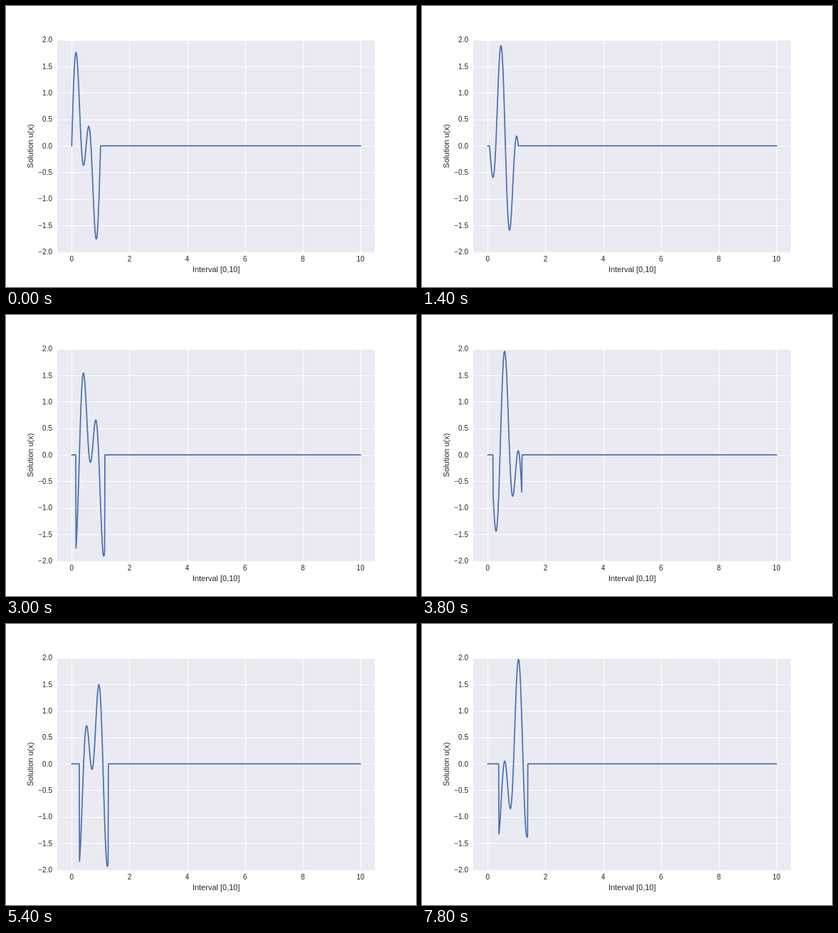
Write an HTML page with a canvas that moves like this. It is 576x396 px and loops after 8000 ms.

```html
<!DOCTYPE html>
<html lang="en">
<head>
<meta charset="utf-8">
<title>Dispersive wave</title>
<style>
  html, body { margin: 0; width: 100%; height: 100%; overflow: hidden; background: #fff; }
  canvas { display: block; }
</style>
</head>
<body>
<canvas id="plot" width="576" height="396"></canvas>
<script>
const ctx = document.getElementById("plot").getContext("2d");

const STEP_MS = 200, STEPS = 40;
const LAST = 1000;   // grid points 0..1000, spaced 0.01
const WIDTH = 100;   // width of the wave window in grid points
const box = { left: 72, right: 518, top: 48, bottom: 347 };
const TAU = 2 * Math.PI;

const px = x => 72 + 446.4 * (x + 0.5) / 11;
const py = u => 47.52 + 298.98 * (2 - u) / 4;

// Two modes, each travelling with its own phase speed 1 + m²
const mode = (m, x, t) => Math.sin(TAU * m * (x - (1 + m * m) * t));

function wave(i, n) {
  if (i < n || i >= n + WIDTH) return 0;
  return mode(1, i / 100, n / 100) + mode(2, i / 100, n / 100);
}

function text(str, x, y, size, align) {
  ctx.font = size + 'px "Liberation Sans", Arial, sans-serif';
  ctx.textAlign = align;
  ctx.fillText(str, x, y);
}

function drawAxes() {
  ctx.fillStyle = "#fff";
  ctx.fillRect(0, 0, 576, 396);
  ctx.fillStyle = "#eaeaf2";
  ctx.fillRect(box.left, box.top, box.right - box.left, box.bottom - box.top);

  ctx.fillStyle = "#fff";
  for (let x = 0; x <= 10; x += 2)
    ctx.fillRect(Math.round(px(x)), box.top, 1, box.bottom - box.top);
  for (let u = -2; u <= 2; u += 0.5)
    ctx.fillRect(box.left, Math.round(py(u)), box.right - box.left, 1);

  ctx.fillStyle = "#262626";
  for (let x = 0; x <= 10; x += 2) text(String(x), px(x), 360, 10, "center");
  for (let u = -2; u <= 2; u += 0.5)
    text(u.toFixed(1).replace("-", "\u2212"), 65, Math.round(py(u) + 3.7), 10, "right");

  text("Interval [0,10]", 295.2, 375, 11, "center");
  ctx.save();
  ctx.translate(38, 197.5);
  ctx.rotate(-Math.PI / 2);
  text("Solution u(x)", 0, 0, 11, "center");
  ctx.restore();
}

function drawWave(n) {
  ctx.save();
  ctx.beginPath();
  ctx.rect(box.left, box.top, box.right - box.left, box.bottom - box.top);
  ctx.clip();
  ctx.beginPath();
  for (let i = 0; i <= LAST; i++) ctx.lineTo(px(i / 100), py(wave(i, n)));
  ctx.strokeStyle = "#4c72b0";
  ctx.lineWidth = 1.75;
  ctx.lineJoin = ctx.lineCap = "round";
  ctx.stroke();
  ctx.restore();
}

function frame() {
  drawAxes();
  drawWave(Math.floor(performance.now() / STEP_MS) % STEPS);
  requestAnimationFrame(frame);
}
frame();
</script>
</body>
</html>
```
